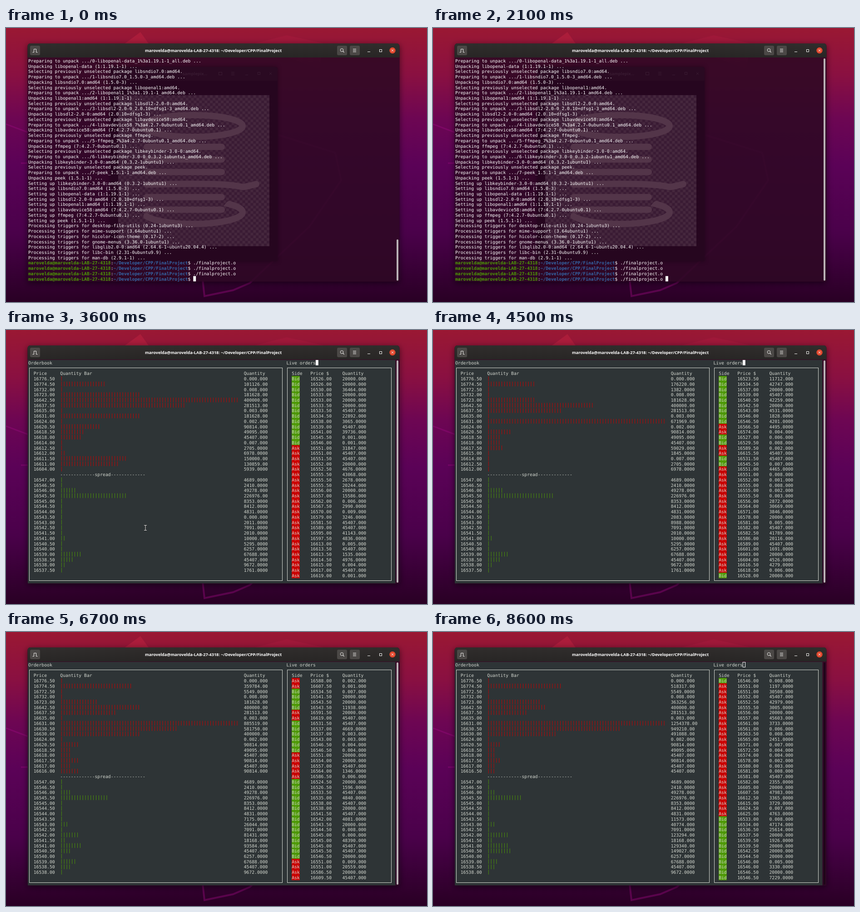
An HTML page with a canvas for the animation above (8.7 s loop, 927 by 604 pixels).

```html
<!DOCTYPE html>
<html lang="en">
<head>
<meta charset="utf-8">
<title>Order book</title>
<style>
html, body { margin: 0; width: 100%; height: 100%; overflow: hidden; background: #4a0448; }
canvas { display: block; }
</style>
</head>
<body>
<canvas id="stage" width="927" height="604"></canvas>
<script>
const W = 927, H = 604, LOOP = 8700, STEP = 100;
const CW = 5.86, CH = 11.725, X0 = 49, Y0 = 66.1;
const USER = 'marovelda', HOST = USER + '@' + USER + '-LAB-27-4318';
const DIR = '~/Developer/CPP/FinalProject', CMD = './finalproject.o';
const MONO = '9.73px "DejaVu Sans Mono", monospace';
const TITLE = 'bold 9.1px "Open Sans", sans-serif';
const GREEN = '#4e9a06', RED = '#cc0000', GREY = '#d3d7cf', LIGHT = '#f2f1ef';
const ctx = document.getElementById('stage').getContext('2d');

// ---- Data ----

const PACKAGES = [
  ['libopenal-data', '1:1.19.1-1', 'all'],
  ['libsndio7.0', '1.5.0-3'],
  ['libopenal1', '1:1.19.1-1'],
  ['libsdl2-2.0-0', '2.0.10+dfsg1-3'],
  ['libavdevice58', '7:4.2.7-0ubuntu0.1'],
  ['ffmpeg', '7:4.2.7-0ubuntu0.1'],
  ['libkeybinder-3.0-0', '0.3.2-1ubuntu1'],
  ['peek', '1.5.1-1']
].map(([name, version, arch = 'amd64'], i) => ({
  label: name + (/^lib/.test(name) && arch !== 'all' ? ':amd64' : ''),
  file: `${i}-${name}_${version.replace(':', '%3a')}_${arch}.deb`,
  version
}));
const SETUP = [6, 1, 0, 3, 2, 4, 5, 7];
const TRIGGERS = ['desktop-file-utils (0.24-1ubuntu3)', 'mime-support (3.64ubuntu1)',
  'hicolor-icon-theme (0.17-2)', 'gnome-menus (3.36.0-1ubuntu1)',
  'libglib2.0-0:amd64 (2.64.6-1~ubuntu20.04.4)', 'libc-bin (2.31-0ubuntu9.9)', 'man-db (2.9.1-1)'];
const LOG = [
  ...PACKAGES.flatMap(p => [
    `Selecting previously unselected package ${p.label}.`,
    `Preparing to unpack .../${p.file} ...`,
    `Unpacking ${p.label} (${p.version}) ...`]).slice(1),
  ...SETUP.map(i => `Setting up ${PACKAGES[i].label} (${PACKAGES[i].version}) ...`),
  ...TRIGGERS.map(name => `Processing triggers for ${name} ...`)
];

// Refresh bursts [first, last] in ms; between two marks the order list scrolls one page.
const BURSTS = [[2400, 2500], [2700, 2900], [3100, 4200], [4400, 4500], [4800, 4900], [5100, 5200],
  [5400, 5800], [6000, 6700], [6900, 6900], [7200, 7700], [7900, 8600]];
const MARKS = [2400, 3600, 4500, 5600, 6700, 8600];
const ROWS = 38, DEPTH = 18, BAR = 66, LOT = 45407;

let seed = 7;
function rnd() {
  seed = (seed * 16807) % 2147483647;
  return seed / 2147483647;
}
const dust = () => rnd() * 0.009;

// A level is its price above 16000, then time and quantity pairs.
const ASKS = [
  [774.5, 2400, 1000, 8600, 518317],
  [772.5, 4300, 1003, 6700, 5549],
  [723, 0, 4 * LOT, 7900, 4 * LOT, 8000, 8 * LOT],
  [642.5, 0, 400000], [637.5, 0, 281513],
  [631, 3600, 4 * LOT, 4500, 671969, 5600, 671969, 8600, 1254378],
  [630.5, 5500, 2 * LOT, 6700, 581750, 8600, 949210],
  [630, 5000, 400000, 6700, 400000, 8600, 491088],
  [620.5, 0, 2 * LOT], [618.5, 0, 49095], [618, 0, LOT],
  [617.5, 4200, LOT, 5200, 2 * LOT], [617, 4800, LOT], [616.5, 7500, LOT], [616, 5400, LOT, 6500, 2 * LOT],
  [615, 4100, 1845], [612.5, 0, 2705], [612, 0, 6978], [611.5, 0, 150000], [611, 0, 130859], [604, 0, 5939],
  ...[776.5, 732, 635, 624, 614].map(p => [p, 0, dust()])
];
const BIDS = [
  [546, 0, 49278], [545.5, 0, 226976], [539, 0, 67688], [538.5, 0, LOT],
  [543.5, 3600, 0, 8600, 11573],
  [543, 2400, 1000, 3600, 2011, 8600, 40774],
  [542, 5400, 10000, 6700, 81431, 8600, 123294],
  [541.5, 4500, 2010, 5600, 18168],
  [541, 4500, 10000, 5600, 25896, 6700, 93584, 8600, 129340],
  [540.5, 4500, 5295, 5600, LOT, 6700, LOT, 8600, 149027],
  [372, 4500, 615000, 5600, 655000, 8600, 1157000]
];
for (let p = 547; p > 537; p -= 0.5)
  if (p !== 539.5 && !BIDS.some(b => b[0] === p)) BIDS.push([p, 0, 1000 + 13000 * rnd() ** 2]);
const LATE = [772.5, 630.5, 630, 617.5, 617, 616.5, 616, 615, 542];

// Lengths of the alternating bid and ask runs in the order stream.
const RUNS = [13, 25, 9, 2, 2, 2, 2, 20, 1, 3, 2, 5, 2, 18, 5, 2, 1, 2, 4, 2, 6, 5, 15, 4, 1, 25, 12];
const ORDERS = RUNS.flatMap((n, i) => {
  const bid = i % 2 === 0;
  const price = () => bid ? 546.5 - 23 * rnd() ** 1.5 : 551 + 80 * rnd() ** 2;
  return Array.from({ length: n }, price).sort((a, b) => a - b).map(p => {
    const sizes = [dust(), dust(), 20000, LOT, 1000 + rnd() * 4000, rnd() * 50000];
    return { bid, price: Math.round(p * 2) / 2, qty: sizes[Math.floor(rnd() * sizes.length)] };
  });
});

function refreshes(from, to) {
  let n = 0;
  for (const [a, b] of BURSTS)
    for (let t = a; t <= b; t += STEP) if (t > from && t <= to) n++;
  return n;
}

function lastRefresh(t) {
  while (t > MARKS[0] && !BURSTS.some(([a, b]) => t >= a && t <= b)) t -= STEP;
  return t;
}

function quantity([, ...keys], t) {
  let i = 0;
  while (i + 2 < keys.length && t >= keys[i + 2]) i += 2;
  const [t0, q0, t1, q1] = keys.slice(i, i + 4);
  return t1 === undefined || t < t0 ? q0 : q0 + (q1 - q0) * (t - t0) / (t1 - t0);
}

const money = p => (16000 + p).toFixed(2);

// Shorter text leaves the tail of what was printed there before.
function overprint(q) {
  const text = q < 1 ? q.toFixed(3) : Math.round(q) + '.00';
  return text + '20000.000'.slice(text.length);
}

// ---- Drawing helpers ----

function box(g, x, y, w, h, color) {
  g.fillStyle = color;
  g.fillRect(x, y, w, h);
}

function round(g, x, y, w, h, r, color) {
  g.beginPath();
  g.roundRect(x, y, w, h, r);
  g.fillStyle = color;
  g.fill();
}

function line(g, pts, color, width = 1) {
  g.beginPath();
  pts.forEach(p => g.lineTo(...p));
  g.strokeStyle = color;
  g.lineWidth = width;
  g.stroke();
}

function poly(g, pts, color) {
  g.beginPath();
  pts.forEach(p => g.lineTo(...p));
  g.fillStyle = color;
  g.fill();
}

function cross(g, x, y, r, color) {
  line(g, [[x - r, y - r], [x + r, y + r]], color);
  line(g, [[x + r, y - r], [x - r, y + r]], color);
}

// Text on the terminal grid.
function put(g, col, row, text, color, bold) {
  g.font = (bold ? 'bold ' : '') + MONO;
  g.textRendering = 'geometricPrecision';
  g.textAlign = 'center';
  g.fillStyle = color;
  for (let i = 0; i < text.length; i++)
    if (text[i] !== ' ') g.fillText(text[i], X0 + (col + i + 0.5) * CW, Y0 + row * CH + 9.8);
}

function layer(paint) {
  const c = document.createElement('canvas');
  c.width = W;
  c.height = H;
  paint(c.getContext('2d'));
  return c;
}

// ---- Still layers ----

function wallpaper(g) {
  const sky = g.createLinearGradient(0, 0, 0, H);
  ['#9a1833', '#8a1041', '#6d0653', '#5b0257', '#4a014a', '#290024']
    .forEach((c, i) => sky.addColorStop([0, 0.17, 0.33, 0.5, 0.75, 1][i], c));
  box(g, 0, 0, W, H, sky);
  poly(g, [[262, 34], [296, 9], [318, 40], [300, 110], [240, 80]], 'rgba(214,44,70,.3)');
  poly(g, [[540, 36], [618, 16], [700, 34], [690, 90]], 'rgba(190,30,70,.2)');
  const edge = 'rgba(150,10,125,.42)';
  line(g, [[0, 212], [48, 230], [180, 270]], edge, 3);
  line(g, [[33, 298], [150, 296]], edge, 3);
  line(g, [[600, 236], [725, 275], [738, 336], [668, 438], [537, 562], [500, 578], [437, 591], [433, 555]], edge, 4);
}

function buttons(g) {
  for (const x of [53, 729, 757]) round(g, x, 39, 22, 21, 3, '#4b4846');
  line(g, [[58.5, 53.5], [61.5, 53.5], [61.5, 46.5], [66.5, 46.5], [66.5, 53.5], [69.5, 53.5]], LIGHT);
  g.beginPath();
  g.arc(739.5, 48.7, 3.3, 0, 7);
  g.stroke();
  line(g, [[742, 51.2], [744.5, 53.8]], LIGHT, 1.2);
  for (const y of [46.5, 49.5, 52.5]) line(g, [[764, y], [771, y]], LIGHT);
  line(g, [[796, 52.5], [802, 52.5]], LIGHT);
  g.strokeRect(822.5, 47.5, 5, 5);
  g.beginPath();
  g.arc(851, 49.5, 6.7, 0, 7);
  g.fillStyle = '#e2492f';
  g.fill();
  cross(g, 851, 49.5, 2.3, '#fff');
}

// Image viewer seen faintly through the terminal.
function ghost(g) {
  const faint = 'rgba(255,255,255,.07)';
  g.shadowColor = 'rgba(15,0,15,.5)';
  g.shadowBlur = 8;
  round(g, 230, 86, 368, 428, [5, 5, 0, 0], '#26061f');
  g.shadowBlur = 0;
  round(g, 230, 86, 368, 30, [5, 5, 0, 0], '#2a0a22');
  g.font = TITLE;
  g.textAlign = 'left';
  g.fillStyle = faint;
  g.fillText('-samplepix...', 386, 103.5);
  for (const y of [97.5, 100.5, 103.5]) line(g, [[496, y], [503, y]], faint);
  line(g, [[527, 103.5], [533, 103.5]], faint);
  g.strokeRect(468.5, 97.5, 7, 6);
  g.strokeRect(554.5, 97.5, 5, 5);
  cross(g, 582.5, 100.5, 2.5, faint);

  const n = 56, s = 333 / n;
  box(g, 247, 148, 333, 333, '#3a1b34');
  for (let y = 0; y < n; y++)
    for (let x = y % 2; x < n; x += 2) box(g, 247 + x * s, 148 + y * s, s, s, '#45273d');

  const coil = new Path2D();
  coil.ellipse(412, 216, 109, 24, 0, 0, 7);
  for (let i = 0; i < 6; i++) {
    const y = 262 + i * 27.7;
    coil.moveTo(310, y);
    if (i === 3) coil.bezierCurveTo(590, y - 8, 480, y + 16, 551, y - 1);
    else coil.lineTo(475, y);
  }
  coil.moveTo(492, 388);
  coil.ellipse(412, 406, 109, 26, 0, -0.75, 2.8);
  g.strokeStyle = '#533549';
  g.lineWidth = 14;
  g.lineCap = 'round';
  g.stroke(coil);
  g.lineCap = 'butt';
}

const frameLayer = layer(g => {
  wallpaper(g);
  g.save();
  g.shadowColor = 'rgba(0,0,0,.55)';
  g.shadowBlur = 14;
  g.shadowOffsetY = 3;
  round(g, 47.5, 34, 819, 525, [6, 6, 0, 0], '#2a0526');
  g.restore();
  g.save();
  g.beginPath();
  g.rect(48, 65, 818, 494);
  g.clip();
  wallpaper(g);
  box(g, 48, 65, 818, 494, 'rgba(46,8,36,.88)');
  g.restore();
  const bar = g.createLinearGradient(0, 34, 0, 65);
  bar.addColorStop(0, '#302d2c');
  bar.addColorStop(1, '#282625');
  round(g, 47.5, 34, 819, 31, [6, 6, 0, 0], bar);
  g.font = TITLE;
  g.textAlign = 'center';
  g.fillStyle = '#fff';
  g.fillText(HOST + ': ' + DIR, 456.5, 53);
  buttons(g);
});

const shellLayer = layer(g => {
  g.drawImage(frameLayer, 0, 0);
  ghost(g);
  LOG.forEach((text, row) => put(g, 0, row, text, '#fff'));
  for (let row = ROWS; row < ROWS + 4; row++) {
    put(g, 0, row, HOST, GREEN, true);
    put(g, 31, row, ':', '#fff');
    put(g, 32, row, DIR, '#3465a4', true);
    put(g, 60, row, '$', '#fff');
    if (row < ROWS + 3) put(g, 62, row, CMD, '#fff');
  }
});

const appLayer = layer(g => {
  g.drawImage(frameLayer, 0, 0);
  box(g, 48, 66, 809.5, 492.5, '#2e3436');
  g.strokeStyle = GREY;
  g.lineWidth = 1;
  g.strokeRect(51.5, 83.5, 557, 469);
  g.strokeRect(619.5, 83.5, 229, 469);
  put(g, 0, 0, 'Orderbook', GREY);
  put(g, 97, 0, 'Live orders', GREY);
  [[2, 'Price'], [12, 'Quantity Bar'], [81, 'Quantity'], [99, 'Side'], [106, 'Price $'], [118, 'Quantity']]
    .forEach(([col, text]) => put(g, col, 2, text, GREY));
});

// ---- Moving parts ----

function cursor(col, row, hollow) {
  const x = X0 + col * CW, y = Y0 + row * CH;
  if (!hollow) return box(ctx, x, y, CW, CH, '#fff');
  ctx.strokeStyle = '#fff';
  ctx.lineWidth = 1;
  ctx.strokeRect(x + 0.3, y + 0.4, CW - 0.5, CH - 0.8);
}

function scrollbar(top, color) {
  round(ctx, 860, top, 4, 557 - top, 2, color);
}

function pointer(x, y) {
  if (x > 48 && x < 857) {
    for (const [color, w] of [['#222', 2.6], ['#eee', 1]]) {
      line(ctx, [[x - 3, y - 5.5], [x + 3, y - 5.5]], color, w);
      line(ctx, [[x - 3, y + 5.5], [x + 3, y + 5.5]], color, w);
      line(ctx, [[x, y - 5.5], [x, y + 5.5]], color, w);
    }
    return;
  }
  const tip = [[0, 0], [0, 13], [3, 10], [9, 9.5], [0, 0]].map(p => [x + p[0], y + p[1]]);
  poly(ctx, tip, '#111');
  line(ctx, tip, '#fff');
}

function drawSide(levels, t, row, color) {
  const list = levels.filter(l => !LATE.includes(l[0]) || t >= l[1])
    .map(l => [l[0], quantity(l, t)]).sort((a, b) => b[0] - a[0]);
  const max = Math.max(...list.map(l => l[1]));
  list.slice(0, DEPTH).forEach(([price, qty], i) => {
    put(ctx, 2, row + i, money(price), GREY);
    put(ctx, 81, row + i, overprint(qty), GREY);
    for (let n = 0; n <= Math.floor(BAR * qty / max); n++)
      box(ctx, X0 + (12 + n) * CW + 2.5, Y0 + (row + i) * CH + 0.8, 0.9, 10.4, color);
  });
}

function drawOrders(t) {
  const k = MARKS.findLastIndex(m => m <= t);
  const part = k < MARKS.length - 1 ? refreshes(MARKS[k], t) / refreshes(MARKS[k], MARKS[k + 1]) : 0;
  const first = Math.round((k - 1 + part) * ROWS) + ORDERS.length;
  for (let i = 0; i < ROWS; i++) {
    const { bid, price, qty } = ORDERS[(first + i) % ORDERS.length], row = 3 + i;
    box(ctx, X0 + 99 * CW, Y0 + row * CH, 3 * CW, CH + 0.3, bid ? GREEN : RED);
    put(ctx, 99, row, bid ? 'Bid' : 'Ask', GREY);
    put(ctx, 106, row, money(price), GREY);
    put(ctx, 118, row, overprint(qty), GREY);
  }
}

function drawShell(t) {
  ctx.drawImage(shellLayer, 0, 0);
  const typed = t < 1800 ? '' : t < 2000 ? '.' : t < 2100 ? './f' : CMD + ' ';
  put(ctx, 62, 41, typed, '#fff');
  if (typed || Math.floor((t + 200) / 600) % 2 === 0) cursor(62 + typed.length, 41);
  scrollbar(t < 2100 ? 466 : 67, '#b9b2b5');
  if (t >= 200 && t < 1800) {
    const u = (1 - Math.min(1, (t - 200) / 1100)) ** 2;
    pointer(642 + 273 * u, 426 - 90 * u);
  }
}

function drawApp(t) {
  const blurred = t >= 8500;
  ctx.drawImage(appLayer, 0, 0);
  if (t >= MARKS[0]) {
    const now = lastRefresh(t);
    drawSide(ASKS, now, 3, RED);
    put(ctx, 12, 21, '-'.repeat(13) + 'spread' + '-'.repeat(13), GREY);
    drawSide(BIDS, now, 22, GREEN);
    drawOrders(now);
  }
  if (blurred || Math.floor((t + 300) / 600) % 2 === 0) cursor(108, 0, blurred);
  scrollbar(67, blurred ? '#1f0519' : '#b9b2b5');
  if (t >= 3100 && t < 3900) {
    const s = (t - 3100) / 1000;
    pointer(640 - 156 * s - 1020 * s * s, 426 + 20 * s);
  }
}

let shown = -1;
function tick(now) {
  const t = Math.floor(now % LOOP / STEP) * STEP;
  if (t !== shown) {
    shown = t;
    (t < 2200 ? drawShell : drawApp)(t);
  }
  requestAnimationFrame(tick);
}
requestAnimationFrame(tick);
</script>
</body>
</html>
```
